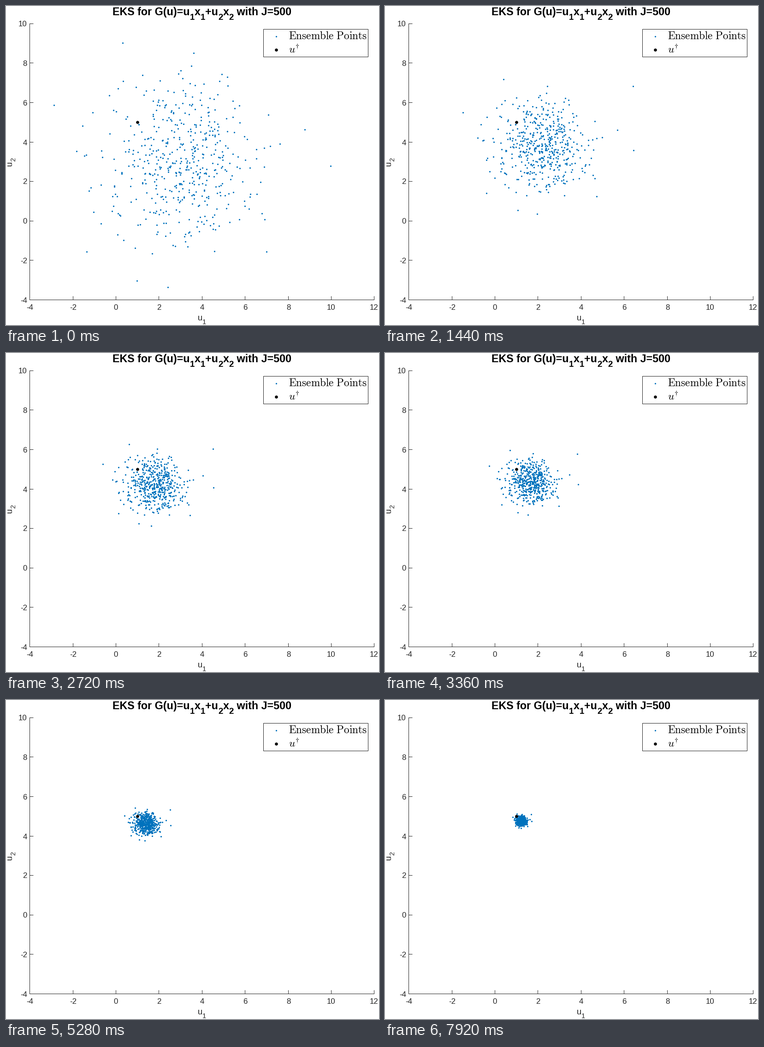
Animation, 809 px wide and 692 px high, one loop 8 s. Source, as a matplotlib script:

```python
import matplotlib.pyplot as plt
import numpy as np
from matplotlib.animation import FuncAnimation
from matplotlib.patches import Rectangle
from matplotlib.textpath import TextPath

W, H, DPI = 809, 692, 100
PT = 72 / DPI  # points per pixel
FRAMES, STEP_MS = 100, 80
N_POINTS = 500
BLUE, INK = "#0072BD", "#262626"
TITLE, LABEL, TICK, LEGEND = 23.3, 18.3, 16.7, 23.2  # text sizes in pixels
TRUTH = np.array([1.0, 5.0])
START_MEAN = np.array([3.05, 2.95])

plt.rcParams["mathtext.fontset"] = "cm"

# A few far members fix the outline of the cloud; the rest is sampled.
EXTREMES = [(0.3, 9.03), (3.6, 8.52), (10.1, 8.75), (8.77, 4.63),
            (9.96, 2.78), (7.0, -1.55), (2.42, -3.36), (0.98, -3.03),
            (-1.36, -1.56), (-2.87, 5.88)]


def sample_core(count, radius=5, sd=1.93):
    rng = np.random.default_rng(12)
    pts = rng.normal(START_MEAN, sd, (2 * count, 2))
    inside = np.hypot(*(pts - START_MEAN).T) < radius
    return pts[inside][:count]


def to_px(u):
    u = np.asarray(u, float)
    return np.stack([238.5 + 46.69 * u[..., 0], 466.3 - 42.79 * u[..., 1]], -1)


ENSEMBLE = np.vstack([EXTREMES, sample_core(N_POINTS - len(EXTREMES))])
DEVIATION = ENSEMBLE - START_MEAN


def ensemble_at(k):
    """Cloud after k steps: its mean drifts to the truth as it contracts."""
    mean = TRUTH + (START_MEAN - TRUTH) * np.exp(-0.031 * k + 0.00009 * k * k)
    spread = np.exp([-0.0272 * k, -0.0345 * k + 0.00006 * k * k])
    mix = -0.04 * (1 - np.exp(-k / 10))
    return mean + (DEVIATION + mix * DEVIATION[:, ::-1]) * spread


fig = plt.figure(figsize=(W / DPI, H / DPI), dpi=DPI, facecolor="white")
ax = fig.add_axes([0, 0, 1, 1])
ax.set_xlim(0, W)
ax.set_ylim(H, 0)
ax.axis("off")


def line(x0, y0, x1, y1):
    ax.plot([x0, x1], [y0, y1], color=INK, lw=PT, solid_capstyle="butt",
            snap=False)


def label(x, y, s, size, color=INK, **kw):
    return ax.text(x, y, s, fontsize=size * PT, color=color, va="baseline",
                   family="Liberation Sans", **kw)


def dots(xy, size, color, z):
    x, y = np.atleast_2d(xy).T
    return ax.plot(x, y, "o", ms=size * PT, mew=0, color=color, zorder=z)[0]


def advance(s, size, weight):
    prop = {"family": "Liberation Sans", "weight": weight}

    def end(t):
        return TextPath((0, 0), t, size=size, prop=prop).get_extents().x1

    return end(s + "|") - end("|")


def subscripted(x, y, parts, size, color=INK, weight="normal", vertical=False):
    """Centre alternating normal and subscript parts on (x, y)."""
    sizes = [size * (0.8 if i % 2 else 1) for i in range(len(parts))]
    widths = [advance(s, sz, weight) for s, sz in zip(parts, sizes)]
    pos = -sum(widths) / 2
    for i, (s, sz, w) in enumerate(zip(parts, sizes, widths)):
        drop = 0.41 * size if i % 2 else 0
        px, py = (x + drop, y - pos) if vertical else (x + pos, y + drop)
        label(px, py, s, sz, color, weight=weight, ha="left",
              rotation=90 if vertical else 0, rotation_mode="anchor")
        pos += w


# Axes, with lines on pixel centres
LEFT, BOTTOM = np.floor(to_px((-4, -4))) + 0.5
RIGHT, TOP = np.floor(to_px((12, 10))) + 0.5
line(LEFT, TOP - 0.5, LEFT, BOTTOM + 0.5)
line(LEFT, BOTTOM, RIGHT + 0.5, BOTTOM)
for v in range(-4, 13, 2):
    x = np.floor(to_px((v, 0))[0]) + 0.5
    line(x, BOTTOM, x, BOTTOM - 8)
    label(x, 659, str(v), TICK, ha="center")
for v in range(-4, 11, 2):
    y = np.floor(to_px((0, v))[1]) + 0.5
    line(LEFT, y, LEFT + 8, y)
    label(46, y + 6, str(v), TICK, ha="right")

subscripted(425, 20, ["EKS for G(u)=u", "1", "x", "1", "+u", "2", "x", "2",
                      " with J=500"], TITLE, "black", "bold")
subscripted(425, 682, ["u", "1"], LABEL)
subscripted(12.5, 337.7, ["u", "2"], LABEL, vertical=True)

# Legend, opaque above the points
ax.add_patch(Rectangle((558.5, 50.5), 227, 60, fc="white", ec=INK, lw=PT,
                       zorder=5, snap=False))
dots((586.5, 66), 3.2, BLUE, 6)
dots((586.5, 94.5), 6.6, "black", 6)
label(613, 72, r"$\mathrm{Ensemble\ Points}$", LEGEND, "black", zorder=6)
label(613, 102, r"$u^{\dagger}$", LEGEND, "black", zorder=6)

cloud = dots(to_px(ENSEMBLE), 3.2, BLUE, 3)
dots(to_px(TRUTH), 6.6, "black", 4)


def update(k):
    cloud.set_data(*to_px(ensemble_at(k)).T)
    return (cloud,)


anim = FuncAnimation(fig, update, frames=FRAMES, interval=STEP_MS,
                     repeat=True, repeat_delay=0)
plt.show()
```
